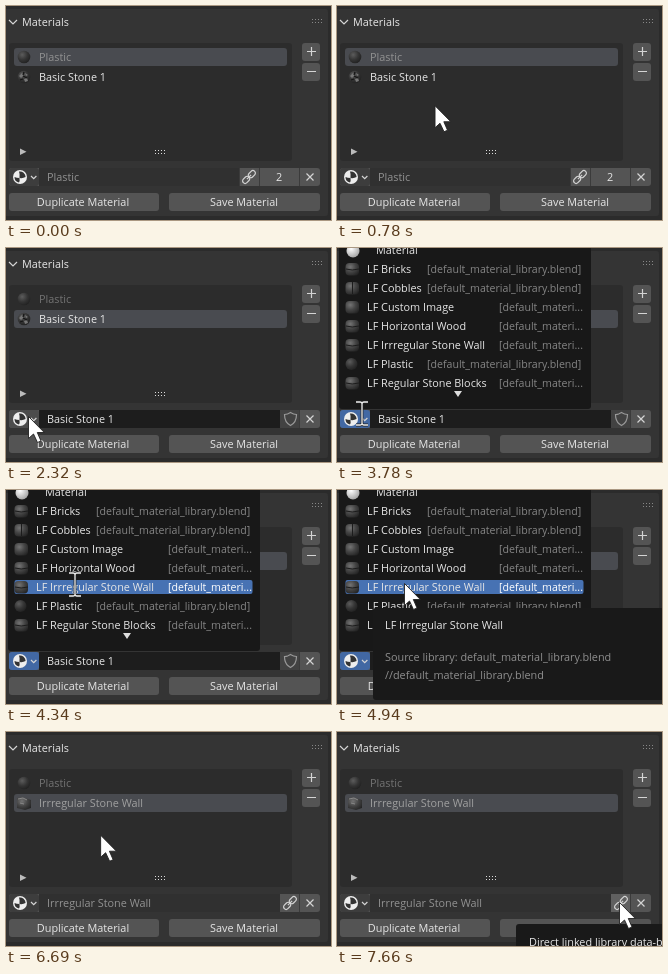
Write an HTML page that moves like this. It is 325x214 px and loops after 8000 ms.

```html
<!DOCTYPE html>
<html lang="en">
<head>
<meta charset="utf-8">
<title>Materials panel</title>
<style>
html, body { margin: 0; width: 100%; height: 100%; overflow: hidden; background: #343434; }
svg { display: block; width: 325px; height: 214px; }
text { font: 10.85px "Open Sans", "Noto Sans", sans-serif; fill: #e6e6e6; white-space: pre; }
.dim { fill: #8f8f8f; }
.source { font-size: 10.6px; fill: #858585; }
.mid { text-anchor: middle; }
.line { fill: none; stroke: #d4d4d4; stroke-width: 1.2; }
</style>
</head>
<body>
<svg id="stage" viewBox="0 0 325 214"></svg>
<script>
const LOOP = 8000;
const stage = document.getElementById('stage');

const rect = (x, y, w, h, fill, r = 3, extra = '') =>
  `<rect x="${x}" y="${y}" width="${w}" height="${h}" rx="${r}" fill="${fill}" ${extra}/>`;
const text = (x, y, s, cls = '', extra = '') => `<text x="${x}" y="${y}" class="${cls}" ${extra}>${s}</text>`;
const path = (d, extra = 'class="line"') => `<path d="${d}" ${extra}/>`;
const group = (id, body) => `<g id="${id}">${body}</g>`;
const ball = (x, y, r, fill = 'url(#dark)') => `<circle cx="${x}" cy="${y}" r="${r}" fill="${fill}"/>`;
const divider = x => path(`M${x} 162v18`, 'stroke="#3b3b3b"');

function grip(x, y, color) {
  let dots = '';
  for (let i = 0; i < 8; i++) dots += rect(x + (i % 4) * 3, y + (i >> 2) * 3, 1, 1, color, 0);
  return dots;
}

const chain = x => `<g transform="translate(${x} 171) rotate(-45)" class="line">
  <rect x="-8" y="-2.5" width="8" height="5" rx="2.5"/><rect x="0" y="-2.5" width="8" height="5" rx="2.5"/>
  <path d="M-3 0H3"/></g>`;

const stoneIcon = ball(18, 71, 6.3) +
  path('M13 70l3-3 2 2-3 3zM18 73l3-1 1 3-3 1zM19 67l3 2-2 1z', 'fill="#777"') +
  path('M14 74l3-1M17 70l4 2M18 66l-1 3', 'stroke="#151515" stroke-width="1.3"');
const wallIcon = path('M11 66l5-1 9 3v8l-6 2-8-2z', 'fill="url(#block)"') +
  path('M12 67l5-1 4 2M14 71l4 1', 'fill="none" stroke="#888"');

const library = '[default_material_library.blend]';
const clipped = '[default_materi...';
const items = [
  ['Bricks', library], ['Cobbles', library], ['Custom Image', clipped],
  ['Horizontal Wood', clipped], ['Irrregular Stone Wall', clipped],
  ['Plastic', library], ['Regular Stone Blocks', clipped]
];
const rowY = i => 21 + 19 * i;

function menuIcon(name, y) {
  if (name === 'Plastic') return ball(14.5, y, 6);
  const seam = name === 'Cobbles' ? `M15.5 ${y - 6}v12` : `M9 ${y}q6 2 13 0`;
  return rect(8.5, y - 6, 13.5, 12.5, 'url(#block)', 4) +
    (name === 'Custom Image' ? '' : path(seam, 'fill="none" stroke="#1c1c1c"'));
}

function menuRow([name, source], i) {
  const y = rowY(i);
  return menuIcon(name, y) + text(30, y + 4, 'LF ' + name) +
    text(source === library ? 90 : 162, y + 4, source, 'source', `id="source${i}"`);
}

const gradient = (id, ...colors) => `<radialGradient id="${id}" cx=".36" cy=".32" r=".8">` +
  colors.map((c, i) => `<stop offset="${i / (colors.length - 1)}" stop-color="${c}"/>`).join('') + '</radialGradient>';

stage.innerHTML =
  gradient('dark', '#5c5c5c', '#353535', '#1c1c1c') +
  gradient('block', '#747474', '#444', '#222') +
  gradient('light', '#fff', '#999') +
  rect(0, 0, 325, 214, '#2b2b2b', 0) + rect(-4, 3, 326, 207, '#343434') +
  path('M3 14l4 4 4-4') + text(16, 20, 'Materials') + grip(306, 13, '#888') +
  rect(3, 37, 283, 118, '#2c2c2c') +
  rect(8, 42, 273, 18, '#494b50', 3, 'id="selection"') +
  ball(18, 51, 6.3) + text(33, 55, 'Plastic', '', 'id="plastic"') +
  group('stone', stoneIcon) + group('wall', wallIcon) + text(33, 75, '', '', 'id="slot"') +
  path('M14 142.5l6.5 3.3-6.5 3.3z', 'fill="#bbb"') + grip(149, 144, '#ddd') +
  rect(296, 37, 18, 18, '#545454') + rect(296, 57, 18, 18, '#545454') +
  path('M301 45.5h9M305.5 41v9M301 65.5h9') +
  rect(3, 162, 311, 18, '#545454') +
  rect(3, 162, 30, 18, '#3d3d3d', 3, 'id="browse"') +
  ball(14, 171, 7, '#eee') +
  path('M13.5 172Q14 168 13 165.5A5.6 5.6 0 0 1 19.6 171Q17 172.500 13.5 172Q10.500 172 8.500 171A5.6 5.6 0 0 0 13 176.500Q14 175 13.5 172z', 'fill="#333"') +
  path('M25 170l2.7 2.7 2.7-2.7') +
  rect(33, 162, 241, 18, '#303030', 0, 'id="field"') + text(41, 175, '', '', 'id="fieldText"') +
  group('shared', rect(233, 162, 61, 18, '#545454', 0) + chain(243) +
    divider(233.5) + divider(253.5) + text(273, 175, '2', 'mid')) +
  group('shield', rect(274, 162, 20, 18, '#424242', 0) +
    path('M284.5 164.5q3 2 6 2q0 8-6 11q-6-3-6-11q3 0 6-2z', 'fill="none" stroke="#999" stroke-width="1.2"')) +
  group('linked', rect(274, 162, 20, 18, '#545454', 0, 'id="linkButton"') + chain(284)) +
  divider(293.5) + path('M300.5 167.5l7 7M307.5 167.5l-7 7') +
  rect(3, 187, 150, 18, '#545454') + text(77, 200, 'Duplicate Material', 'mid') +
  rect(163, 187, 151, 18, '#545454') + text(238, 200, 'Save Material', 'mid') +
  group('menu', rect(2, -5, 252, 166, '#181818') +
    rect(8.5, 0, 238, 14, '#4772b3', 2, 'id="hover"') +
    ball(16, 3, 6.5, 'url(#light)') + text(39, 6, 'Material') +
    items.map(menuRow).join('') + path('M117 143h8l-4 6z', 'fill="#ddd"')) +
  group('itemTip', rect(36, 118, 300, 92, '#191919') + text(48, 139, 'LF Irrregular Stone Wall') +
    text(48, 171, 'Source library: default_material_library.blend', 'dim') +
    text(48, 189, '//default_material_library.blend', 'dim')) +
  group('linkTip', rect(179, 192, 160, 40, '#191919') +
    text(192, 214, 'Direct linked library data-block, click to make local')) +
  group('arrow', path('M.5.5V22.5L5.5 18 9.5 26.5 13 25 9.3 16.5H16.3Z', 'fill="#fff" stroke="#222" stroke-width=".9"')) +
  group('beam', ['#222" stroke-width="2.8', '#eee" stroke-width="1.3'].map(stroke =>
    path('M-6-12h4Q0-12 0-10Q0-12 2-12H6M0-10V9M-6 11h4Q0 11 0 9Q0 11 2 11H6', `fill="none" stroke="${stroke}"`)).join(''));

const ui = {};
stage.querySelectorAll('[id]').forEach(node => { ui[node.id] = node; });
const show = (id, on) => ui[id].setAttribute('display', on ? 'inline' : 'none');
const paint = (id, color) => { ui[id].style.fill = color; };

// Pointer moves; those that appear are first seen at their starting point.
const moves = [
  { start: 450, last: 1010, steps: 8, from: [143, 152], to: [68, 65], appears: true },
  { start: 1690, last: 2320, steps: 9, from: [68, 65], to: [22, 168] },
  { start: 2470, last: 2470, steps: 1, from: [22, 168], to: [22, 169] },
  { start: 3780, last: 4110, steps: 5, from: [25, 166], to: [69, 90], appears: true },
  { start: 4260, last: 4340, steps: 2, from: [69, 90], to: [69, 95] },
  { start: 4940, last: 4940, steps: 1, from: [69, 95], to: [67, 93] },
  { start: 6540, last: 7180, steps: 9, from: [67, 93], to: [282, 170] }
];
const smooth = u => u * u * (3 - 2 * u);

function pointer(t) {
  const move = moves.filter(m => t >= m.start).pop();
  if (!move) return null;
  const { start, last, steps, from, to, appears } = move;
  const gap = (last - start) / Math.max(1, steps - 1) || 1;
  const k = Math.min(steps - 1, Math.floor((t - start) / gap + 1e-6));
  const u = smooth(appears ? k / (steps - 1) : (k + 1) / steps);
  return from.map((v, i) => v + (to[i] - v) * u);
}

function render(t) {
  const at = pointer(t);
  const first = t < 1330;
  const assigned = t >= 5110;
  const readOnly = first || assigned;
  const open = t >= 2470 && !assigned;
  const beam = t >= 2470 && t < 4940;
  const name = assigned ? 'Irrregular Stone Wall' : 'Basic Stone 1';

  ui.selection.setAttribute('y', first ? 42 : 62);
  paint('plastic', first ? '#929292' : '#737373');
  show('stone', !assigned);
  show('wall', assigned);
  ui.slot.textContent = name;
  paint('slot', assigned ? '#a0a0a0' : '#e6e6e6');

  ui.fieldText.textContent = first ? 'Plastic' : name;
  paint('fieldText', readOnly ? '#929292' : '#e6e6e6');
  paint('field', readOnly ? '#303030' : '#1d1d1d');
  show('shared', first);
  show('shield', !readOnly);
  show('linked', assigned);

  const overBrowse = at && at[0] < 33 && at[1] > 161;
  const overLink = at && at[0] > 274 && at[1] > 161;
  paint('browse', open ? '#4268a3' : overBrowse ? '#4c4c4c' : '#3d3d3d');
  paint('linkButton', overLink ? '#606060' : '#545454');

  show('menu', open);
  const row = open ? Math.round((at[1] - 21) / 19) : -1;
  const hovering = row >= 0 && row < items.length;
  show('hover', hovering);
  if (hovering) ui.hover.setAttribute('y', rowY(row) - 7);
  items.forEach((_, i) => paint('source' + i, i === row ? '#fff' : ''));

  show('itemTip', t >= 4790 && open);
  show('linkTip', t >= 7660);
  show('arrow', at && !beam);
  show('beam', beam);
  if (at) ui[beam ? 'beam' : 'arrow'].setAttribute('transform', `translate(${at[0]} ${at[1]})`);
}

const began = performance.now();
function tick() {
  render((performance.now() - began) % LOOP);
  requestAnimationFrame(tick);
}
tick();
</script>
</body>
</html>
```
